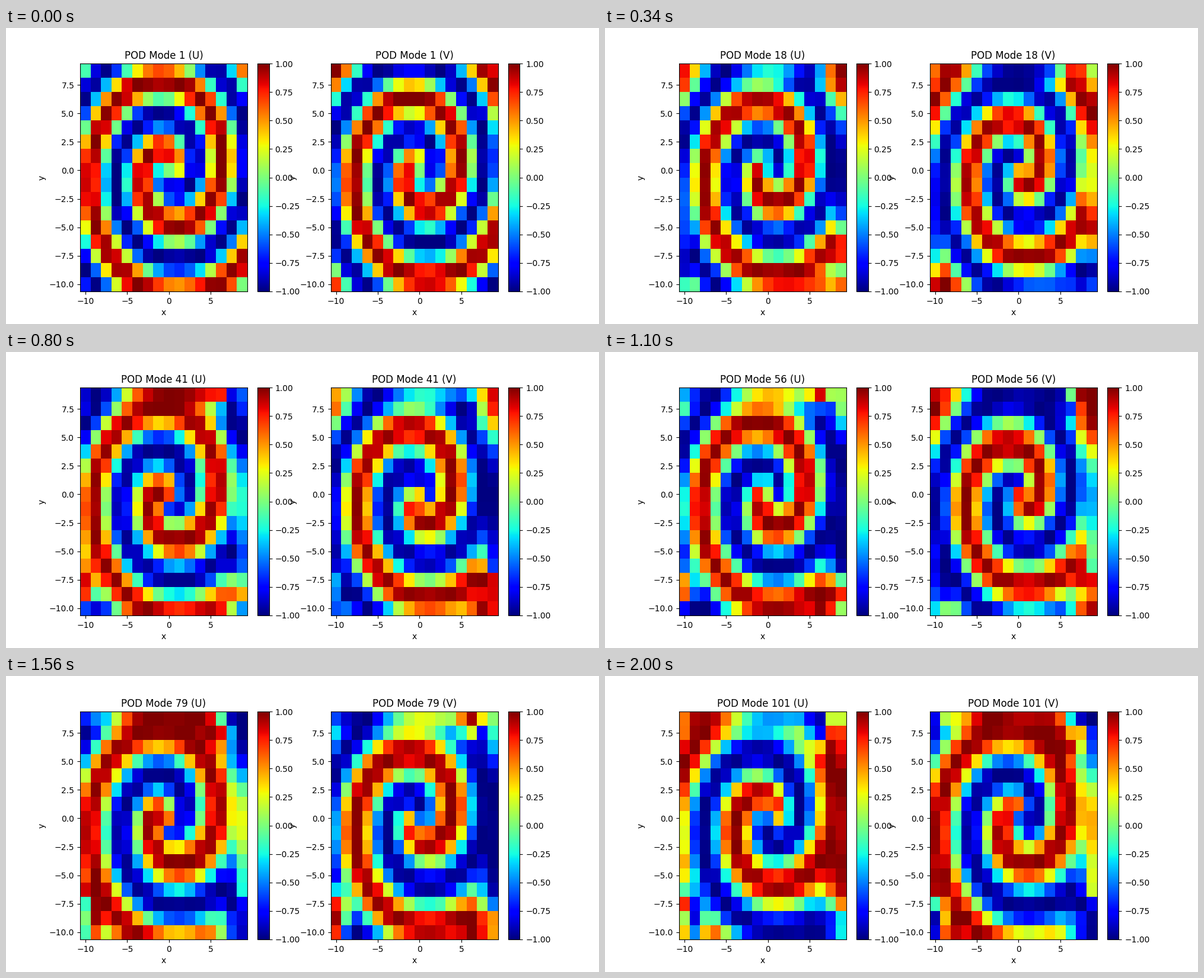
A matplotlib script that plays this animation: 1000 by 500 pixels, repeating every 2020 ms.

```python
import numpy as np
import matplotlib.pyplot as plt
from matplotlib.animation import FuncAnimation

# Lambda-omega spiral wave on a periodic square: Fourier Laplacian, Euler steps
N, SIZE = 16, 20.0
DIFF, BETA = 0.1, 1.0
FRAMES, DT, SUB = 101, 0.1, 5

axis = -SIZE / 2 + SIZE / N * np.arange(N)
X, Y = np.meshgrid(axis, axis)
wave = 2 * np.pi * np.fft.fftfreq(N, SIZE / N)
K2 = wave[None, :] ** 2 + wave[:, None] ** 2


def rate(w):
    """Time derivative of the complex field w = u + iv."""
    amp = np.abs(w) ** 2
    return (1 - amp - 1j * BETA * amp) * w - DIFF * np.fft.ifft2(K2 * np.fft.fft2(w))


def solve():
    r = np.hypot(X, Y)
    w = np.tanh(r) * np.exp(1j * (np.arctan2(Y, X) - r))
    fields = [w]
    for _ in range(FRAMES - 1):
        for _ in range(SUB):
            w = w + DT * rate(w)
        fields.append(w)
    return fields


fields = solve()
fig, axes = plt.subplots(1, 2, figsize=(10, 5), dpi=100)
meshes = []
for ax in axes:
    mesh = ax.pcolormesh(X, Y, np.zeros((N, N)), cmap="jet", vmin=-1, vmax=1,
                         shading="nearest")
    fig.colorbar(mesh, ax=ax)
    ax.set_xlabel("x")
    ax.set_ylabel("y")
    meshes.append(mesh)


def draw(i):
    parts = (fields[i].real, fields[i].imag)
    for ax, mesh, part, name in zip(axes, meshes, parts, "UV"):
        mesh.set_array(part)
        ax.set_title(f"POD Mode {i + 1} ({name})")
    return meshes


anim = FuncAnimation(fig, draw, frames=FRAMES, interval=20, repeat=True,
                     repeat_delay=0, blit=False)
plt.show()
```
